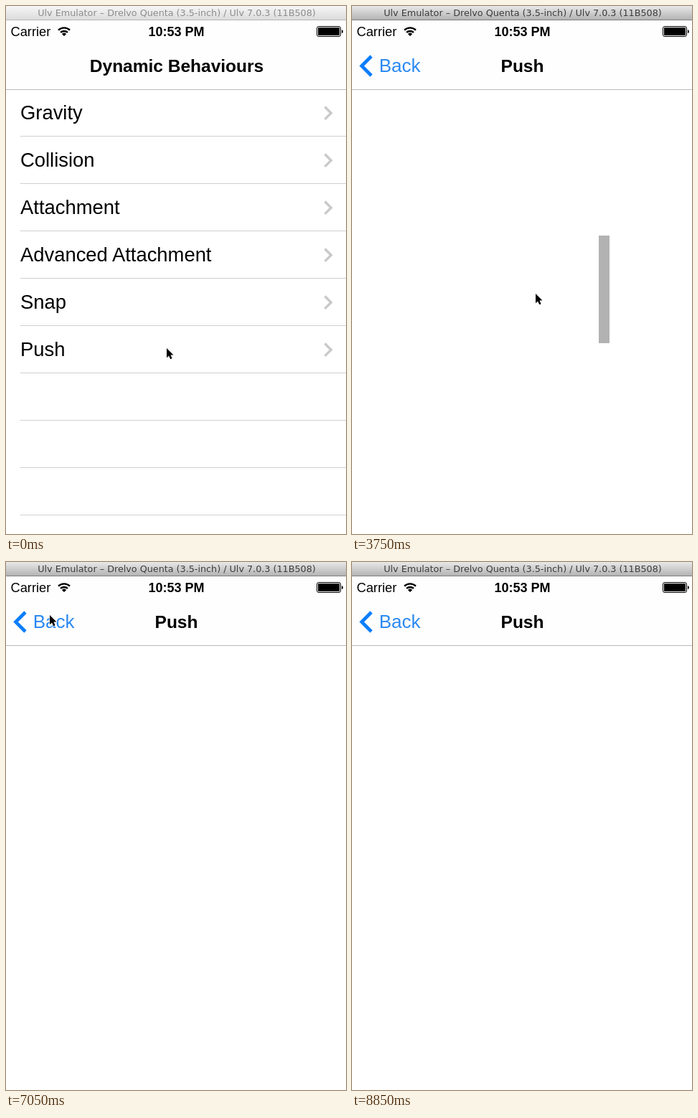
Recreate the animation shown at these times as an HTML page. Size 474 px wide and 736 px high, loop 9 s.

```html
<!DOCTYPE html>
<html lang="en">
<head>
<meta charset="utf-8">
<title>Dynamic Behaviours</title>
<style>
  html, body { margin: 0; width: 100%; height: 100%; overflow: hidden; background: #fff; }
  svg { display: block; width: 474px; height: 736px; }
  text { font-family: "Liberation Sans", Arial, sans-serif; }
  .caption { font: 12.75px "DejaVu Sans", sans-serif; text-anchor: middle; }
  .row { font-size: 27.4px; }
  .title { font-size: 24.5px; font-weight: bold; text-anchor: middle; }
  .chevron { fill: none; stroke: #c9c9cb; stroke-width: 3.4; }
</style>
</head>
<body>
<svg viewBox="0 0 474 736">
  <defs>
    <linearGradient id="active" x2="0" y2="1">
      <stop stop-color="#e8e8e8"/><stop offset="1" stop-color="#b4b4b4"/>
    </linearGradient>
    <linearGradient id="inactive" x2="0" y2="1">
      <stop stop-color="#f6f6f6"/><stop offset="1" stop-color="#dcdcdc"/>
    </linearGradient>
    <linearGradient id="shade">
      <stop stop-color="#6a6850" stop-opacity="0"/><stop offset="1" stop-color="#6a6850" stop-opacity=".22"/>
    </linearGradient>
  </defs>

  <rect width="474" height="736" fill="#fff"/>
  <g id="list"><rect id="highlight" y="445" width="478" height="67" fill="#dfdfdf"/></g>
  <rect id="dim" y="116" width="474" height="620" fill="#000b16"/>
  <g id="detail">
    <rect id="edge" x="-9" y="116" width="10" height="620" fill="url(#shade)"/>
    <rect id="bar" y="320" width="15" height="150" fill="#b2b2b2"/>
  </g>

  <rect id="nav" y="20" width="474" height="96"/>
  <rect y="116" width="474" height="1" fill="#b9b9b9"/>
  <text id="listTitle" class="title" y="92">Dynamic Behaviours</text>
  <text id="detailTitle" class="title" y="92">Push</text>
  <g id="back" fill="#2b89f2">
    <path d="M27 70 13.5 83.5 27 97" fill="none" stroke="#0b7dfb" stroke-width="4.6"/>
    <text id="backLabel" y="92" font-size="26">Back</text>
  </g>

  <text x="6.5" y="42" font-size="18.3">Carrier</text>
  <g fill="none" stroke="#000" stroke-width="2.4">
    <path d="M73 33.6a11.6 11.6 0 0 1 16 0M76 36.9a7.4 7.4 0 0 1 10 0"/>
    <path d="M81 42 77.9 38.9a4.7 4.7 0 0 1 6.2 0z" fill="#000" stroke="none"/>
  </g>
  <text x="237.5" y="42" font-size="18" font-weight="bold" text-anchor="middle">10:53 PM</text>
  <rect x="433.5" y="28.5" width="33" height="14" rx="2.5" fill="#fff" stroke="#000"/>
  <rect x="435" y="30" width="30" height="11" rx="1"/>
  <path d="M468 33q2 .5 2 2.5t-2 2.5z"/>

  <rect id="windowBar" width="474" height="19"/>
  <rect id="windowLine" y="19" width="474" height="1"/>
  <text id="caption" class="caption" x="238" y="14">Ulv Emulator – Drelvo Quenta (3.5-inch) / Ulv 7.0.3 (11B508)</text>

  <path id="cursor" d="M1 0V13.2L4 10.4 6.2 15.3 8.6 14.2 6.4 9.5H10.5z" stroke="#fff" stroke-width="1.2" paint-order="stroke"/>
</svg>
<script>
const LOOP = 9000, STEP = 150, WIDTH = 474, BAR_START = 208;
const SVG = "http://www.w3.org/2000/svg";
const $ = id => document.getElementById(id);
const set = (id, attrs) => {
  for (const key in attrs) $(id).setAttribute(key, attrs[key]);
};
const add = (tag, attrs, text = "") => {
  const node = document.createElementNS(SVG, tag);
  for (const key in attrs) node.setAttribute(key, attrs[key]);
  node.textContent = text;
  $("list").append(node);
};

const rows = ["Gravity", "Collision", "Attachment", "Advanced Attachment", "Snap", "Push"];
for (let i = 0; i < 9; i++) {
  const top = 116 + 66 * i;
  add("rect", { x: 20, y: top + 65, width: 458, height: 1, fill: "#cfcfd1" });
  if (!rows[i]) continue;
  add("text", { x: 20, y: top + 42, class: "row" }, rows[i]);
  add("path", { d: `M444.5 ${top + 24.5}l8.7 8.7-8.7 8.7`, class: "chevron" });
}

// time, share of the list screen in view
const screens = [[0, 1], [750, 0], [4950, 1], [5850, 0], [7200, .1], [7350, .75], [7500, 1], [7950, 0]];
// time, opacity of the selected row
const highlights = [[0, 0], [450, 1], [750, 0], [7200, 1], [7350, .6], [7500, 0]];
// time, x, y of the pointer tip
const pointer = [
  [0, 223, 477], [600, 223, 477], [1050, 197, 402], [1300, 255, 401],
  [4200, 255, 401], [4650, 60, 74], [4950, 60, 74], [5400, 223, 477],
  [5850, 223, 477], [6150, 298, 393], [6600, 298, 393], [7050, 60, 74],
  [7350, 60, 74], [7650, 223, 477], [7950, 223, 477], [8100, 330, 395],
  [8250, 330, 395], [8550, 60, 74], [LOOP, 60, 74]
];

const held = (table, t) => table.findLast(step => step[0] <= t)[1];

function pointerAt(t) {
  const i = pointer.findIndex(key => key[0] > t);
  const [t0, x0, y0] = pointer[i - 1], [t1, x1, y1] = pointer[i];
  const u = (t - t0) / (t1 - t0), e = u * u * (3 - 2 * u);
  return [x0 + (x1 - x0) * e, y0 + (y1 - y0) * e];
}

// First push drifts and slows down; the later ones keep accelerating.
function barAt(t) {
  const glide = from => 289 * (1 - Math.exp(-Math.max(0, t - from) / 3800));
  const thrust = (from, a) => a / 2 * Math.max(0, t - from) ** 2;
  const moved = t < 5400 ? glide(1340) : t < 7500 ? thrust(6150, .00169) : thrust(8100, .006);
  return Math.round(BAR_START + moved);
}

function draw(t) {
  const p = held(screens, t), sliding = p > 0 && p < 1;
  const fade = Math.max(0, 1 - 3.3 * p);
  const listX = Math.round(-143 * (1 - p)), active = t >= 300;

  set("list", { transform: `translate(${listX})`, opacity: p > 0 ? 1 : 0 });
  set("highlight", { opacity: held(highlights, t) });
  set("dim", { opacity: sliding ? .1 * (1 - p) : 0 });
  set("detail", { transform: `translate(${Math.round(WIDTH * p)})`, opacity: p < 1 ? 1 : 0 });
  set("edge", { opacity: sliding ? 1 : 0 });
  set("bar", { x: barAt(t) });

  set("nav", { fill: sliding ? "#f9f9f9" : "#fefefe" });
  set("listTitle", { x: 238 - 150 * (1 - p), opacity: Math.max(0, (p - .4) / .6) });
  set("detailTitle", { x: 237.5 + 190 * p, opacity: fade });
  set("back", { opacity: fade });
  set("backLabel", { x: 37.7 + 100 * p });

  set("windowBar", { fill: active ? "url(#active)" : "url(#inactive)" });
  set("windowLine", { fill: active ? "#808080" : "#b8b8b8" });
  set("caption", { fill: active ? "#3c3c3c" : "#8c8c8c" });
  set("cursor", { transform: `translate(${pointerAt(t)})`, opacity: t < 8850 ? 1 : 0 });
}

const start = performance.now();
function tick() {
  const t = (performance.now() - start) % LOOP;
  draw(Math.floor(t / STEP) * STEP);
  requestAnimationFrame(tick);
}
tick();
</script>
</body>
</html>
```
